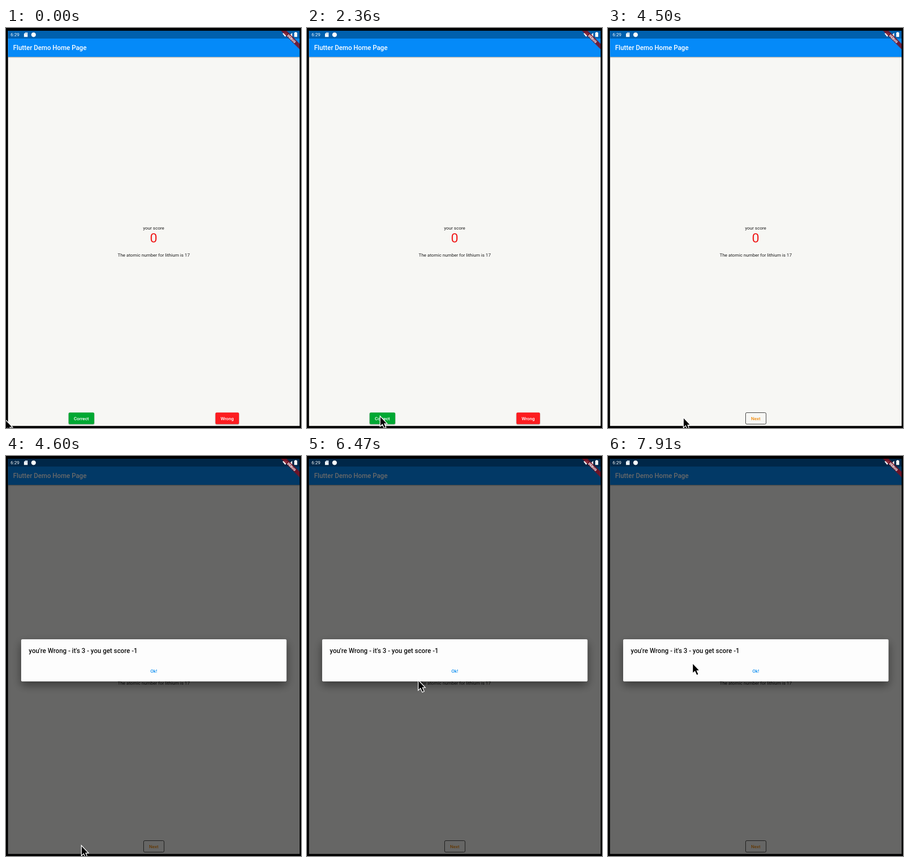
Recreate the animation shown at these times as an HTML page. Size 642x873 px, loop 8000 ms.

```html
<!DOCTYPE html>
<html lang="en">
<head>
<meta charset="utf-8">
<title>Quiz app</title>
<style>
  html, body { margin: 0; width: 100%; height: 100%; overflow: hidden; background: #000; }
  svg { display: block; width: 642px; height: 873px; font: 9.93px Roboto, sans-serif; }
  .mid { text-anchor: middle; }
  .medium { font-weight: 500; }
  .heading { font-size: 14.2px; font-weight: 500; }
  .raised { filter: drop-shadow(0 1px 1px rgba(0, 0, 0, .4)); }
  #card { filter: drop-shadow(0 8px 10px rgba(0, 0, 0, .45)); }
  #next, #dialog { opacity: 0; }
</style>
</head>
<body>
<svg viewBox="0 0 642 873">
  <defs>
    <clipPath id="screen"><rect x="4.4" y="6" width="634.6" height="862.5"/></clipPath>
  </defs>
  <rect width="642" height="873"/>

  <g clip-path="url(#screen)">
    <rect width="642" height="873" fill="#f7f7f4"/>
    <rect class="raised" width="642" height="63" fill="#058af8"/>
    <rect width="642" height="23" fill="#0060ae"/>
    <text class="heading" x="15.5" y="48" fill="#fff">Flutter Demo Home Page</text>

    <g class="mid" fill="#1c1c1c">
      <text x="321.3" y="440">your score</text>
      <text x="321.3" y="468.3" font-size="28.4" fill="#f01818">0</text>
      <text x="321.5" y="498.5">The atomic number for lithium is 17</text>
    </g>

    <g id="answers" class="mid medium" fill="#fff">
      <rect class="raised" x="136.3" y="839.3" width="55.7" height="25.2" rx="2.8" fill="#00a833"/>
      <text x="164" y="855.7">Correct</text>
      <rect class="raised" x="455.8" y="839.3" width="51.2" height="25.2" rx="2.8" fill="#fc1c20"/>
      <text x="481.3" y="855.7">Wrong</text>
    </g>

    <g id="next" class="mid medium">
      <rect x="299.5" y="839.5" width="44.5" height="25" rx="2.5" fill="none" stroke="#222"/>
      <text x="321.5" y="855.7" fill="#f08c10">Next</text>
    </g>

    <g id="dialog">
      <rect width="642" height="873" opacity=".59"/>
      <rect id="card" x="33" y="400" width="577.5" height="92" rx="2.8" fill="#fdfdfd"/>
      <text class="heading" x="49.6" y="430" fill="#111">you're Wrong - it's 3 - you get score -1</text>
      <text class="mid medium" x="321.5" y="473" fill="#0a8cf0">Ok!</text>
    </g>

    <g fill="#fff">
      <text x="10" y="18.4">6:29</text>
      <path d="M42 10H47V19.5H39.2V12.8Z"/>
      <path d="M42.2 11.5v2M43.8 11.5v2M45.4 11.5v2" stroke="#0060ae" stroke-width=".6"/>
      <circle cx="60" cy="14.8" r="5"/>
      <path d="M601.8 12.2Q607.5 7.8 613.2 12.2L607.5 19.2Z"/>
      <path d="M614 19.4L622.8 10.4V19.4Z"/>
      <path d="M629 10V9h3v1h1.7v9.5h-6.4V10Z"/>
    </g>

    <g transform="translate(621.8 23.2) rotate(45)">
      <rect x="-30" y="-4.3" width="60" height="8.6" fill="#7a1022" opacity=".88"/>
      <text class="mid" y="2.6" font-size="7.2" font-weight="900" fill="#fff">DEBUG</text>
    </g>
  </g>

  <path id="cursor" d="M1 2V24.5L6 20L10 28.5L14 26.7L10.5 18.5H16.5Z" stroke="#fff" stroke-width="1.5"/>
</svg>

<script>
  const LOOP = 8000;
  const ANSWERED = 4500;
  const DIALOG_OPEN = 4600;

  function loop(id, frames) {
    document.getElementById(id).animate(frames, { duration: LOOP, iterations: Infinity });
  }

  // The easing applies from this stop to the next one.
  function stop(time, x, y, easing = 'ease-in-out') {
    return { offset: time / LOOP, transform: `translate(${x}px, ${y}px)`, easing };
  }

  function switchAt(id, time, from, to) {
    loop(id, [
      { offset: 0, opacity: from, easing: 'step-end' },
      { offset: time / LOOP, opacity: to },
      { offset: 1, opacity: to }
    ]);
  }

  loop('cursor', [
    stop(0, -2, 853),
    stop(820, 157, 845),
    stop(1420, 155, 854),
    stop(2400, 158, 845),
    stop(4080, 158, 845),
    stop(4400, 163, 848),
    stop(5070, 163, 848, 'ease-out'),
    stop(6470, 241, 487, 'ease-in'),
    stop(7910, 183, 450),
    stop(LOOP, 183, 450)
  ]);
  switchAt('answers', ANSWERED, 1, 0);
  switchAt('next', ANSWERED, 0, 1);
  switchAt('dialog', DIALOG_OPEN, 0, 1);
</script>
</body>
</html>
```
